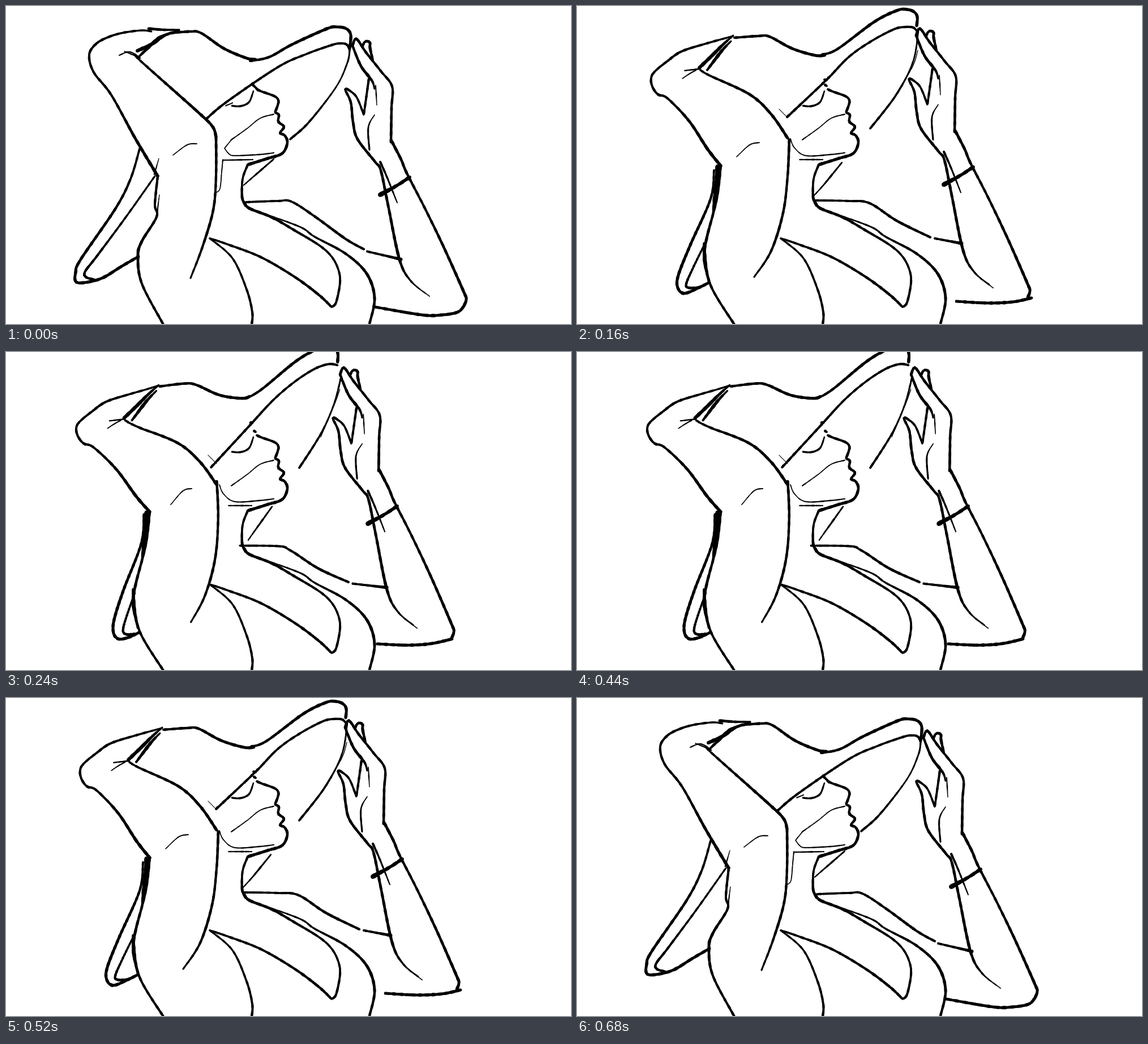
Animation of 998x561 px, one loop 720 ms. Source, as an HTML page:

```html
<!DOCTYPE html>
<html lang="en">
<head>
<meta charset="utf-8">
<title>Woman adjusting a hat</title>
<style>
html, body { margin: 0; width: 100%; height: 100%; overflow: hidden; background: #fff; }
svg { display: block; width: 100vw; height: 100vh; }
path { fill: #000; stroke: #000; stroke-width: .8; stroke-linejoin: round; }
</style>
</head>
<body>
<svg viewBox="0 0 998 561"><path id="ink"/></svg>
<script>
const LOOP = 720, STEP = 3;

// One value drives the pose: 0 = arms low, 1 = arms high.
const steps = [[0, 0], [80, .25], [160, .5], [240, .84], [320, 1], [440, .84], [520, .5], [600, .25], [680, 0]];

const lerp = (a, b, k) => a + (b - a) * k;
const clamp = v => Math.min(1, Math.max(0, v));
const fix = n => n.toFixed(1);

const moves = {
  // the right arm slides up and left, its elbow a little less
  arm: (p, lift) => ({
    x: p.x - 26 * lift,
    y: p.y - 36 * lift * (1 - Math.max(0, p.y - 330) / 1000)
  }),
  // the left hand sinks in the upper half of the motion
  hand: (p, lift) => {
    const k = clamp(lift * 2 - 1) * clamp((283 - p.y) / 170) * clamp((400 - p.x) / 150);
    return { x: p.x - 11 * k, y: p.y + 11 * k };
  }
};

// w: widths along the stroke; at: key shapes, half a lift apart, "!" is a corner;
// from, to: the lifts between which the line shows.
const lines = [
  // face
  { w: '4 4.5 5', at: ['443,147 452,151 474,159 481,166 480,175 475,188! 482,192 481,204 491,213 484,224 492,228 497,241 488,260 462,269 427,280'] },
  { w: '3 3.5 2.5', at: ['399,176 411,177 423,174 431,167 437,150'] },
  { w: '2 1.6 2', at: ['473,191 449,198 426,216 398,236'] },
  { w: '1.6 1.8 2.2 2', at: ['399,235 386,251! 394,261 404,264 448,262 473,259', '377,234 384,250 404,264 448,262 473,259'] },
  { w: '2 2.4 2', at: ['383,272 436,271', '393,271 434,271'] },
  { w: '1.8 1.5', to: 0, at: ['383,271 381,292 378,322 371,329'] },
  { w: '4', to: .25, at: ['435,138 445,148'] },
  { w: '1.8', to: 0, at: ['388,176 400,171'] },
  { w: '4', from: .5, at: ['437,130 441,131', '429,122 433,122'] },
  { w: '4', from: .5, at: ['438,139 441,141'] },
  // neck, back and dress
  { w: '4 3.5 5', at: ['427,280 418,305 417,337 422,349'] },
  { w: '5 4 3.5 4.5 4 3.5', at: ['420,346 430,357 470,373 510,396 553,422 575,442 587,465 590,488 583,523 575,531! 553,510 510,478 450,443 390,420 360,410'] },
  { w: '2 3 4 5 4', at: ['455,366 520,390 545,407 600,437 637,472 651,515 642,561'] },
  { w: '3 4', at: ['360,410 400,445 425,500 435,540 434,562'] },
  { w: '2.5 3.2 2', at: ['473,270 436,302 420,316', '468,276 437,314 419,334', '471,271 443,313 432,331'] },
  { w: '3.6 3.5 4 4.5 4', at: ['424,346 480,344 504,345 545,371 600,411 632,429', '420,343 480,344 517,348 565,379 624,408', '410,341 478,342 497,352 545,383 596,405'] },
  { w: '3.5 4 5', at: ['638,433 698,447', '632,410 680,419', '603,408 670,414'] },
  // right arm and hand
  { w: '5 4 4.5 5', move: 'arm', at: ['681,238 698,271 708,295 740,357 773,425 808,503 813,517 809,529'] },
  { w: '5 5 4.5', at: ['809,529 798,540 770,545 735,545 652,531', '803,515 770,522 725,524 670,521', '781,502 742,511 700,514 649,512'] },
  { w: '4 3.5 4.5 4.5 4.5 5 1.5', move: 'arm', at: ['641,128 632,192! 620,162 608,150 599,147 609,170 613,205 621,235 652,275 662,290 675,352 695,447 715,485 748,512'] },
  { w: '1 2 1', from: .5, move: 'arm', at: ['706,471 720,490 742,506'] },
  { w: '4.5 4 4.5', move: 'arm', at: ['612,70 619,58 636,82 663,116 682,142 681,180 680,240'] },
  { w: '4 5 4', move: 'arm', at: ['630,71 633,64 638,62 643,65 643,74 648,96'] },
  { w: '4 4.5 5 3', move: 'arm', at: ['612,70 627,106 646,131 651,146'] },
  { w: '1.5 2.2 1', move: 'arm', at: ['653,140 655,175'] },
  { w: '1.5 3 3', move: 'arm', at: ['651,192 640,214 642,254'] },
  { w: '4 3 2', move: 'arm', at: ['661,275 673,302 691,347'] },
  { w: '8 5.5 6', move: 'arm', at: ['661,333 690,317 713,302'] },
  // hat
  { w: '4 4.5 5', at: ['290,48 325,45 345,48 385,75 425,92 441,94', '278,56 320,53 340,54 380,75 420,87 438,87', '268,63 312,57 335,60 375,76 415,79 426,74'] },
  { w: '4 5 5', at: ['431,97 465,90 505,68 567,40 585,37 601,40 609,51 607,75', '432,86 460,76 525,28 565,8 582,6 595,10 601,19 600,35', '421,80 450,59 507,10 545,-12 572,-14 579,-6 579,10'] },
  { w: '4 4 3.6 4', at: ['353,200 390,169 480,108 530,85 575,69 590,66 602,68 607,78', '371,196 440,131 480,90 520,62 560,41 580,37 594,38 601,45', '358,207 432,122 480,70 520,36 555,16 578,13'] },
  { w: '3 2.5 3.5 4', at: ['607,78 603,100 583,143 535,205 502,235', '603,42 594,97 565,155 518,216', '586,48 574,85 553,137 518,199'] },
  { w: '1 2 1', from: .5, at: ['602,78 592,108 556,167', '584,60 572,92 556,142'] },
  // left hand
  { w: '5 3', to: 0, at: ['252,40 280,42 306,42'] },
  { w: '3 6 6', move: 'hand', at: ['306,43 280,52 258,67 232,79', '276,52 258,68 240,86 216,109'] },
  { w: '3 6 4', move: 'hand', at: ['300,46 272,55 250,75 234,90', '272,62 255,80 230,113'] },
  { w: '2 2.5', move: 'hand', at: ['200,87 215,81 226,84 237,92', '190,114 216,111'] },
  { w: '1.5 2.5', move: 'hand', at: ['209,80 229,88', '186,128 198,120 210,113'] },
  // left arm
  { w: '3 4 4 4 5 5.5', move: 'hand', at: ['257,45 240,43 208,47 183,54 160,66 147,86 155,117 186,157 228,233 268,300', '276,53 229,66 185,80 160,97 138,115 131,127 133,142 143,156 160,163 198,203 231,253 254,282'] },
  { w: '4 4 5 4 4', at: ['268,300 263,350 266,372 240,415 233,441 240,490 278,562', '254,282 247,340 229,410 226,440 237,495 278,562'] },
  { w: '7 8 7 3', from: .5, at: ['248,283 247,310 240,366'] },
  { w: '3 5 2', from: .5, at: ['224,418 225,450 232,487'] },
  { w: '1 2.5', to: 0, at: ['270,269 262,297'] },
  { w: '1 3', to: 0, at: ['271,333 266,372'] },
  { w: '3.5 4.5 5', move: 'hand', at: ['230,88 240,99 340,188 365,213 371,231', '218,113 235,123 305,156 343,191 372,233'] },
  { w: '4.5 4 4.5 3', at: ['371,230 371,300 366,360 347,425 326,480', '375,236 372,300 364,365 343,432 313,478', '371,225 376,290 372,365 355,430 333,476'] },
  { w: '1.5 2', at: ['295,263 320,245 337,243', '282,266 305,245 322,241', '295,271 316,245 331,241'] },
  { w: '1', from: .5, at: ['357,182 372,197'] },
  // hanging brim behind the arm
  { w: '3.5 4.5 5 5', at: ['236,252 220,305 193,358 132,447 123,470 124,487 145,487 172,479 203,460 234,442', '242,290 236,340 200,422 179,475 178,497 190,507 217,496 233,488', '244,285 240,338 211,420 195,480 198,505 215,507 236,498'] },
  { w: '3 3.5 4.5', at: ['263,300 212,372 160,442 140,468 141,478 156,483', '228,415 205,462 193,490 197,497 215,497', '227,430 213,485 218,498 234,498'] }
];

// Dense smooth curve through the listed points.
function trace(text) {
  const pts = text.split(' ').map(s => {
    const [x, y] = s.split(',').map(parseFloat);
    return { x, y, corner: s.endsWith('!') };
  });
  const cubic = (a, b, c, d, t) =>
    b + .5 * t * (c - a + t * (2 * a - 5 * b + 4 * c - d + t * (3 * (b - c) + d - a)));
  const out = [];
  for (let i = 0; i < pts.length - 1; i++) {
    const b = pts[i], c = pts[i + 1];
    const a = i && !b.corner ? pts[i - 1] : b;
    const d = pts[i + 2] && !c.corner ? pts[i + 2] : c;
    for (let t = 0; t < 1; t += 1 / 16) {
      out.push({ x: cubic(a.x, b.x, c.x, d.x, t), y: cubic(a.y, b.y, c.y, d.y, t) });
    }
  }
  return [...out, pts[pts.length - 1]];
}

// Distance travelled at each point of a curve.
function measure(path) {
  let sum = 0;
  return path.map((p, i) => sum += i ? Math.hypot(p.x - path[i - 1].x, p.y - path[i - 1].y) : 0);
}

// Evenly spaced points, so that key shapes can be blended one to one.
function resample(path, count) {
  const dist = measure(path), total = dist[dist.length - 1];
  let i = 1;
  return Array.from({ length: count }, (_, n) => {
    const goal = total * n / (count - 1);
    while (i < path.length - 1 && dist[i] < goal) i++;
    const k = clamp((goal - dist[i - 1]) / (dist[i] - dist[i - 1] || 1));
    return { x: lerp(path[i - 1].x, path[i].x, k), y: lerp(path[i - 1].y, path[i].y, k) };
  });
}

function shape(line, lift) {
  const { keys, from = 0, to = 1, move } = line;
  if (lift < from || lift > to) return [];
  const pos = Math.min((lift - from) * 2, keys.length - 1), i = Math.floor(pos);
  const a = keys[i], b = keys[i + 1] || a;
  const pts = a.map((p, n) => ({ x: lerp(p.x, b[n].x, pos - i), y: lerp(p.y, b[n].y, pos - i) }));
  return move ? pts.map(p => moves[move](p, lift)) : pts;
}

// Brush stroke with changing width and a slightly uneven edge.
function brush(path, widths) {
  const w = widths.split(' ').map(Number);
  const radius = i => {
    const u = i / (path.length - 1) * (w.length - 1), n = Math.floor(u);
    const width = lerp(w[n], w[n + 1] ?? w[n], u - n);
    return Math.max(.15, width * (1 + .08 * Math.sin(i * 1.3)) / 2 - .4);
  };
  return path.map((p, i) => {
    const r = radius(i), f = fix(r), f2 = fix(2 * r);
    let d = `M${fix(p.x - r)} ${fix(p.y)}a${f} ${f} 0 1 0 ${f2} 0a${f} ${f} 0 1 0 -${f2} 0z`;
    const q = path[i + 1];
    if (q) {
      const len = Math.hypot(q.x - p.x, q.y - p.y) || 1, s = radius(i + 1);
      const nx = (p.y - q.y) / len, ny = (q.x - p.x) / len;
      const at = (o, k) => `${fix(o.x + nx * k)} ${fix(o.y + ny * k)}`;
      d += `M${at(p, r)}L${at(q, s)}L${at(q, -s)}L${at(p, -r)}z`;
    }
    return d;
  }).join('');
}

for (const line of lines) {
  const paths = line.at.map(trace);
  const longest = Math.max(...paths.map(p => measure(p).pop()));
  line.keys = paths.map(p => resample(p, Math.ceil(longest / STEP) + 2));
}

const drawings = new Map();
for (const [, lift] of steps) {
  if (!drawings.has(lift)) drawings.set(lift, lines.map(l => brush(shape(l, lift), l.w)).join(''));
}

const ink = document.getElementById('ink');
const start = performance.now();
let shown;

function draw(time) {
  const lift = steps.filter(([at]) => at <= time).pop()[1];
  if (lift !== shown) ink.setAttribute('d', drawings.get(shown = lift));
}

function tick() {
  draw(Math.max(0, performance.now() - start) % LOOP);
  requestAnimationFrame(tick);
}
tick();
</script>
</body>
</html>
```
